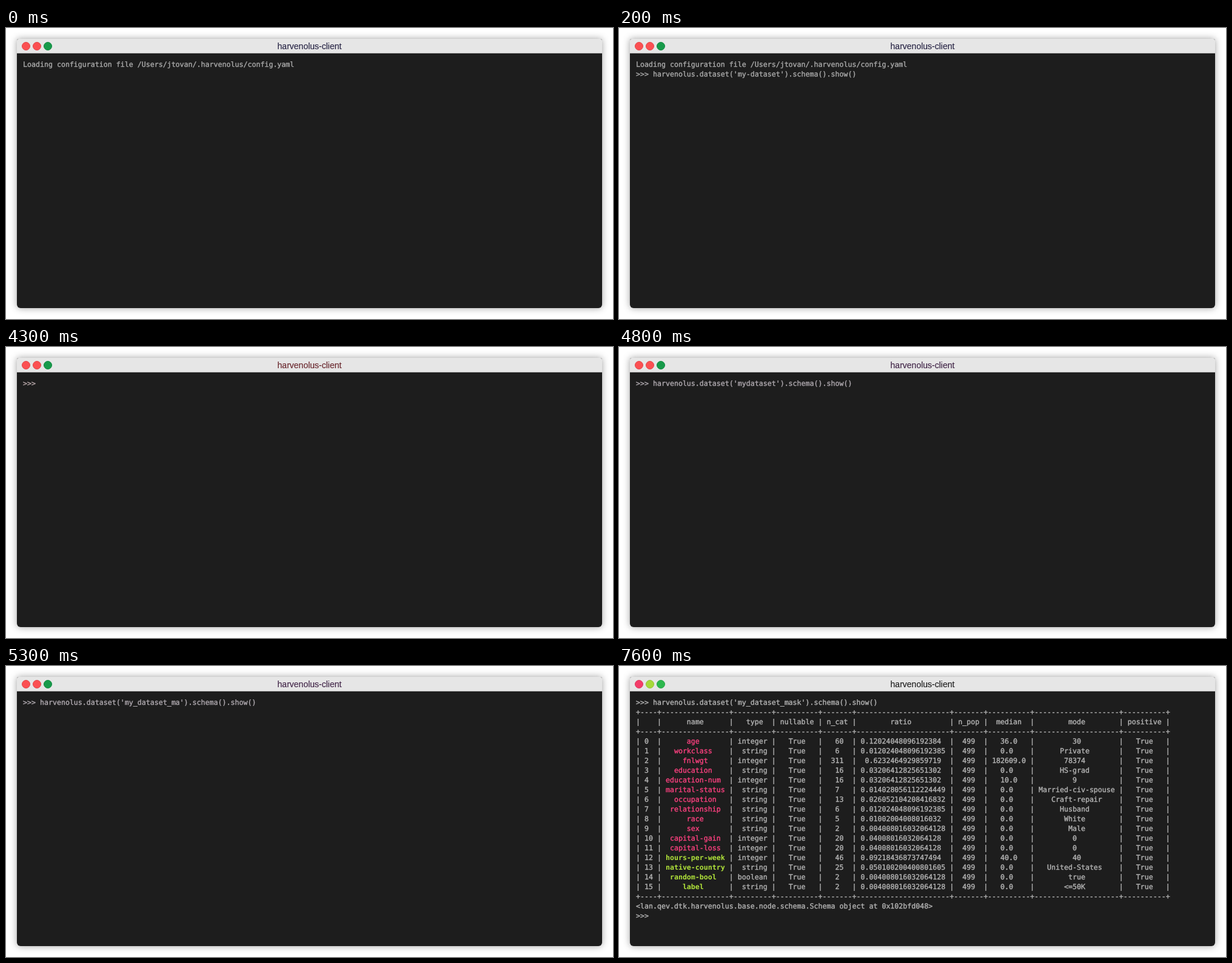
An HTML page that plays this animation: 1001x480 px, repeating every 9.7 s.

```html
<!DOCTYPE html>
<html lang="en">
<head>
<meta charset="utf-8">
<title>Terminal</title>
<style>
  html, body { margin: 0; width: 100%; height: 100%; overflow: hidden; background: #fff; }
  svg { display: block; width: 1001px; height: 480px; }
  #title { font: 14px "Liberation Sans", Arial, sans-serif; text-anchor: middle; stroke-width: .2px; }
  #screen { font: 11.627px "DejaVu Sans Mono", monospace; text-rendering: geometricPrecision; stroke-width: .4px; }
  #screen text { white-space: pre; }
  #screen .bold { font-weight: bold; stroke: none; }
  #window { filter: drop-shadow(0 0 6px rgba(0, 0, 0, .38)); }
</style>
</head>
<body>
<svg viewBox="0 0 1001 480">
  <g id="window">
    <path d="M18 21a3 3 0 0 1 3-3H980a3 3 0 0 1 3 3V456a6 6 0 0 1-6 6H24a6 6 0 0 1-6-6Z" fill="#1d1d1d"/>
  </g>
  <path d="M18 42V21a3 3 0 0 1 3-3H980a3 3 0 0 1 3 3V42Z" fill="#e6e6e6"/>
  <path d="M18 41.5H983" stroke="#b1b1b1"/>
  <g id="buttons"></g>
  <text id="title" x="500.5" y="35">harvenolus-client</text>
  <g id="screen"></g>
</svg>
<script>
const LOOP = 9700, POPULATION = 499;
const GREEN = '#b0e23a', PINK = '#f8407e';
const screen = document.getElementById('screen');
const title = document.getElementById('title');

function add(parent, tag, attrs, text = '') {
  const node = document.createElementNS('http://www.w3.org/2000/svg', tag);
  for (const key in attrs) node.setAttribute(key, attrs[key]);
  node.textContent = text;
  parent.appendChild(node);
  return node;
}

const paint = color => ({ fill: color, stroke: color });

function setPaint(node, fill, stroke = fill) {
  node.setAttribute('fill', fill);
  node.setAttribute('stroke', stroke);
}

const buttons = [33, 51, 69].map(cx =>
  add(document.getElementById('buttons'), 'circle', { cx, cy: 30, r: 6.5 }));

// name, type, category count, mode, median
const fields = [
  ['age', 'integer', 60, '30', '36.0'],
  ['workclass', 'string', 6, 'Private'],
  ['fnlwgt', 'integer', 311, '78374', '182609.0'],
  ['education', 'string', 16, 'HS-grad'],
  ['education-num', 'integer', 16, '9', '10.0'],
  ['marital-status', 'string', 7, 'Married-civ-spouse'],
  ['occupation', 'string', 13, 'Craft-repair'],
  ['relationship', 'string', 6, 'Husband'],
  ['race', 'string', 5, 'White'],
  ['sex', 'string', 2, 'Male'],
  ['capital-gain', 'integer', 20, '0'],
  ['capital-loss', 'integer', 20, '0'],
  ['hours-per-week', 'integer', 46, '40', '40.0'],
  ['native-country', 'string', 25, 'United-States'],
  ['random-bool', 'boolean', 2, 'true'],
  ['label', 'string', 2, '<=50K']
];
const header = ['', 'name', 'type', 'nullable', 'n_cat', 'ratio', 'n_pop', 'median', 'mode', 'positive'];
const rows = fields.map(([name, type, count, mode, median = '0.0'], i) =>
  [i, name, type, 'True', count, count / POPULATION, POPULATION, median, mode, 'True'].map(String));
const widths = header.map((h, i) => Math.max(h.length, ...rows.map(r => r[i].length)));

// Odd slack goes left of even-length text and right of odd-length text.
function center(text, width) {
  const slack = width - text.length;
  const left = text.length % 2 ? Math.floor(slack / 2) : Math.ceil(slack / 2);
  return ' '.repeat(left) + text + ' '.repeat(slack - left);
}

// A line is a list of [text, attributes] runs.
const plain = text => [[text]];
const masked = paint(PINK);
const active = { ...paint(GREEN), class: 'bold' };

function tableRow(cells, nameStyle) {
  const padded = cells.map((c, i) => ` ${center(c, widths[i])} `);
  return [[`|${padded[0]}|`], [padded[1], nameStyle], [`|${padded.slice(2).join('|')}|`]];
}

function table(maskedCount, address) {
  const rule = plain('+' + widths.map(w => '-'.repeat(w + 2)).join('+') + '+');
  return [
    rule, tableRow(header), rule,
    ...rows.map((r, i) => tableRow(r, i < maskedCount ? masked : active)),
    rule,
    plain(`<lan.qev.dtk.harvenolus.base.node.schema.Schema object at ${address}>`),
    plain('>>> ')
  ];
}

const command = name => plain(`>>> harvenolus.dataset('${name}').schema().show()`);
const loading = plain('Loading configuration file /Users/jtovan/.harvenolus/config.yaml');
const prompt = plain('>>> ');

const theme = (titleColor, text, fills, strokes) => ({ titleColor, text, fills, strokes });
const dimFills = ['#fb5052', '#fb5052', '#179a4a'];
const dimStrokes = ['#e2464a', '#e2464a', '#128a40'];
const dim = (titleColor, text) => theme(titleColor, text, dimFills, dimStrokes);
const startTheme = dim('#2b2848', '#a8a8a8');
const clearTheme = dim('#6b2a30', '#b6a6a8');
const typeTheme = dim('#44284a', '#aea8ae');
const firstTable = theme('#222', '#b2b2b2', ['#e2524f', '#a6d93a', '#2db84e'], ['#d04844', '#d8643c', '#27a545']);
const maskTable = theme('#222', '#b2b2b2', ['#f43d69', '#a6d93a', '#2db84e'], ['#dc385f', '#92c435', '#27a545']);

const scenes = [
  [0, startTheme, [loading]],
  [100, startTheme, [loading, prompt]],
  [200, startTheme, [loading, command('my-dataset')]],
  [2300, firstTable, [loading, command('my-dataset'), ...table(0, '0x102b502e8')]],
  [4300, clearTheme, [prompt]],
  [4400, typeTheme, [command('my-dataset')]],
  [4800, typeTheme, [command('mydataset')]],
  [4900, typeTheme, [command('my_dataset')]],
  ...[...'_mask'].map((_, i) =>
    [5100 + i * 100, typeTheme, [command('my_dataset' + '_mask'.slice(0, i + 1))]]),
  [7600, maskTable, [command('my_dataset_mask'), ...table(12, '0x102bfd048')]]
];

function draw([, look, lines]) {
  setPaint(title, look.titleColor);
  setPaint(screen, look.text);
  buttons.forEach((b, i) => setPaint(b, look.fills[i], look.strokes[i]));
  screen.replaceChildren();
  lines.forEach((runs, i) => {
    const line = add(screen, 'text', { x: 28, y: 64 + i * 16 });
    for (const [text, attrs] of runs) add(line, 'tspan', attrs, text);
  });
}

let shown;
const start = performance.now();
function update(now) {
  const time = Math.max(0, now - start) % LOOP;
  const scene = scenes.findLast(s => s[0] <= time);
  if (scene !== shown) draw(shown = scene);
  requestAnimationFrame(update);
}
update(start);
</script>
</body>
</html>
```
